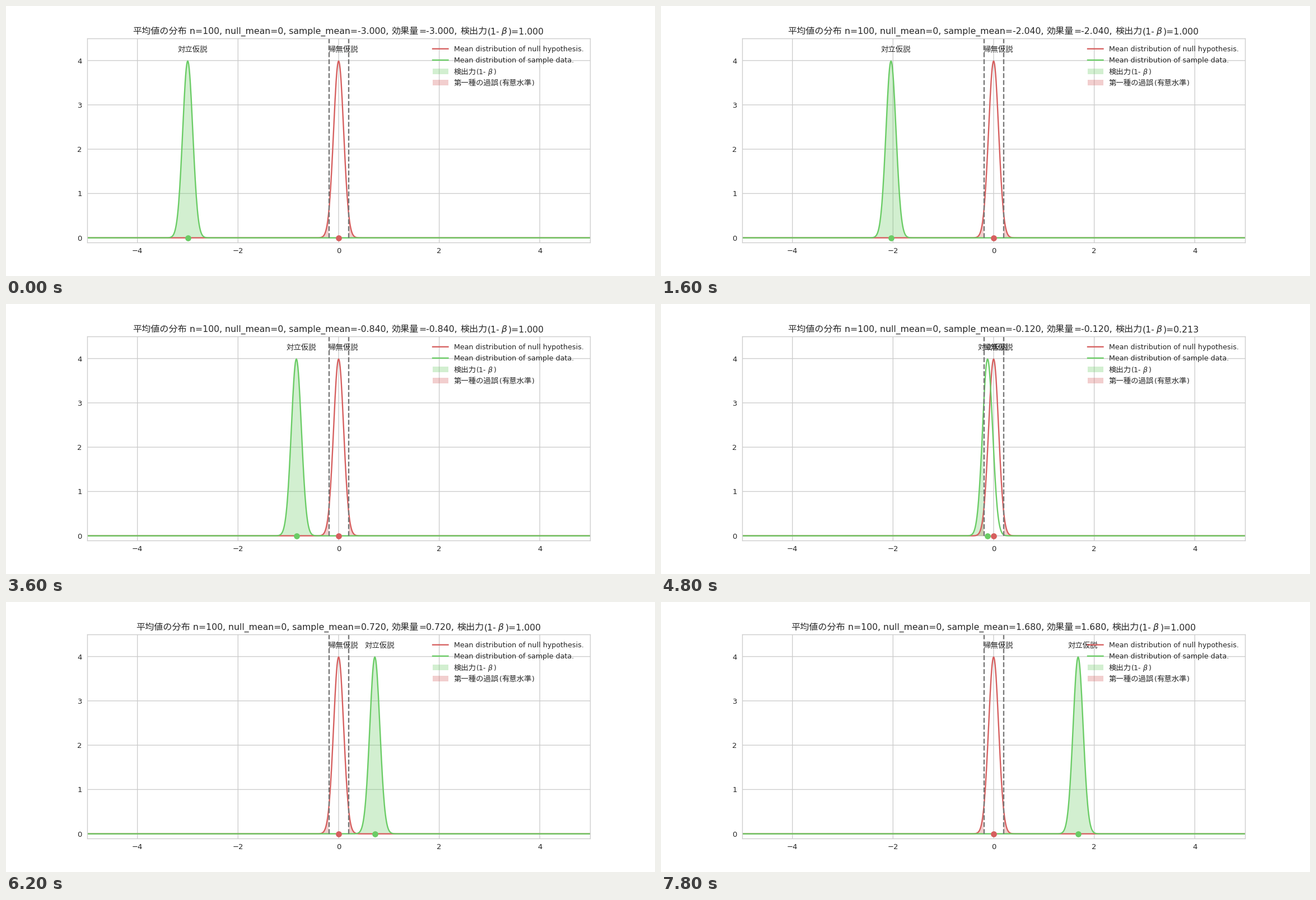
A matplotlib script for the animation above (8 s loop, 1159x483 px).

```python
import math
from itertools import groupby

import numpy as np
import matplotlib.pyplot as plt
from matplotlib.animation import FuncAnimation
from matplotlib.lines import Line2D
from matplotlib.patches import Rectangle
from matplotlib.textpath import TextPath

W, H, DPI = 1159, 483, 96.58
FRAMES, INTERVAL = 40, 200
RED, GREEN, INK, GRID = "#d65f5f", "#6acc65", "0.15", "0.8"
LATIN, CJK = "DejaVu Sans", "Noto Sans CJK JP"
TITLE_SIZE, LABEL_SIZE = (12, 11.72), (10, 9.38)  # Japanese, Latin
N, SIGMA, CRIT = 100, 0.1, 0.2
STEP = 0.01
LINE = 1.75

fig = plt.figure(figsize=((W + 0.01) / DPI, (H + 0.01) / DPI), dpi=DPI,
                 facecolor="white")
ax = fig.add_axes([0.125, 0.125, 0.775, 0.755])
xs = np.arange(-5, 5 + STEP / 2, STEP)
tails = np.abs(xs) >= CRIT - 1e-9
widths = {}


def ink_width(s, family):
    return TextPath((0, 0), s, size=100, prop={"family": [family]}).get_extents().width


def advance(s, family, size):
    """Width in pixels, counting outer spaces."""
    key = s, family
    if key not in widths:
        widths[key] = (ink_width(f"|{s}|", family) - ink_width("||", family)) / 100
    return widths[key] * size * DPI / 72


def script(ch):
    return "latin" if ch.isascii() else "greek" if "α" <= ch <= "ω" else "cjk"


def mixed_text(x, y, s, sizes, center=False, zorder=3):
    """Write Latin, Greek and Japanese runs on one baseline, in pixels from top left."""
    cjk_size, latin_size = sizes
    runs = []
    for kind, chars in groupby(s, script):
        part = "".join(chars)
        family, size = (CJK, cjk_size) if kind == "cjk" else (LATIN, latin_size)
        bare = part.lstrip()
        width = advance(part, family, size)
        lead = width - advance(bare, family, size)
        style = "normal"
        if kind == "greek":  # slanted, centred in a full-width cell
            cell = len(part) * cjk_size * DPI / 72
            lead, width, style = (cell - width) / 2, cell, "italic"
        runs.append((bare.rstrip(), family, size, style, lead, width))
    if center:
        x -= sum(run[-1] for run in runs) / 2
    texts = []
    for part, family, size, style, lead, width in runs:
        texts.append(fig.text((x + lead) / W, 1 - y / H, part, family=family,
                              fontsize=size, style=style, color=INK,
                              va="baseline", zorder=zorder))
        x += width
    return texts


def x_pixel(value):
    return W * (0.125 + 0.775 * (value + 5) / 10)


def bell(mean):
    z = (xs - mean) / SIGMA
    return np.exp(-z * z / 2) / (SIGMA * math.sqrt(2 * math.pi))


def phi(z):
    return 0.5 * (1 + math.erf(z / math.sqrt(2)))


def power(mean):
    return phi((-CRIT - mean) / SIGMA) + phi((mean - CRIT) / SIGMA)


def distribution(mean, color, name):
    ys = bell(mean)
    area = ax.fill_between(xs, ys, where=tails, color=color, alpha=0.3, lw=0)
    curve, = ax.plot(xs, ys, color=color, lw=LINE)
    dot, = ax.plot([mean], [0], "o", color=color, ms=7, mew=1, zorder=3)
    return [area, curve, dot] + mixed_text(x_pixel(mean - 0.2), 82.4, name, LABEL_SIZE)


def legend_row(row, label, color, filled):
    y = 81.3 + 20.15 * row
    if filled:
        key = Rectangle((762 / W, 1 - y / H), 27.5 / W, 9.4 / H,
                        transform=fig.transFigure, fc=color, alpha=0.3, lw=0)
    else:
        mid = 1 - (y - 4.7) / H
        key = Line2D([762 / W, 789.5 / W], [mid, mid], color=color, lw=LINE,
                     snap=False)
    key.set_zorder(5)
    fig.add_artist(key)
    mixed_text(800, y, label, LABEL_SIZE, zorder=5)


def setup():
    ax.set(xlim=(-5, 5), ylim=(-0.1, 4.5), xticks=range(-4, 5, 2), yticks=range(5))
    ax.set_axisbelow(True)
    ax.grid(color=GRID, lw=1, snap=False)
    ax.tick_params(length=0, pad=7, labelsize=9.8, labelcolor=INK,
                   labelfontfamily=LATIN)
    for spine in ax.spines.values():
        spine.set(color=GRID, linewidth=1)
    distribution(0, RED, "帰無仮説")
    # Each limit sits on the first sample inside or past the critical value.
    for edge in (-CRIT + STEP, CRIT):
        ax.plot([edge, edge], [0, 4.5], "--", color="#777777", lw=LINE, zorder=2.2)
    legend_row(0, "Mean distribution of null hypothesis.", RED, False)
    legend_row(1, "Mean distribution of sample data.", GREEN, False)
    legend_row(2, "検出力(1-β)", GREEN, True)
    legend_row(3, "第一種の過誤(有意水準)", RED, True)


moving = []


def update(i):
    while moving:
        moving.pop().remove()
    mean = round(-3 + 0.12 * i, 3)
    moving.extend(distribution(mean, GREEN, "対立仮説"))
    title = (f"平均値の分布 n={N}, null_mean=0, sample_mean={mean:.3f}, "
             f"効果量={mean:.3f}, 検出力(1-β)={power(mean):.3f}")
    moving.extend(mixed_text(x_pixel(0), 50, title, TITLE_SIZE, center=True))
    return moving


setup()
anim = FuncAnimation(fig, update, frames=FRAMES, interval=INTERVAL,
                     init_func=lambda: [], repeat=True, repeat_delay=0)
plt.show()
```
